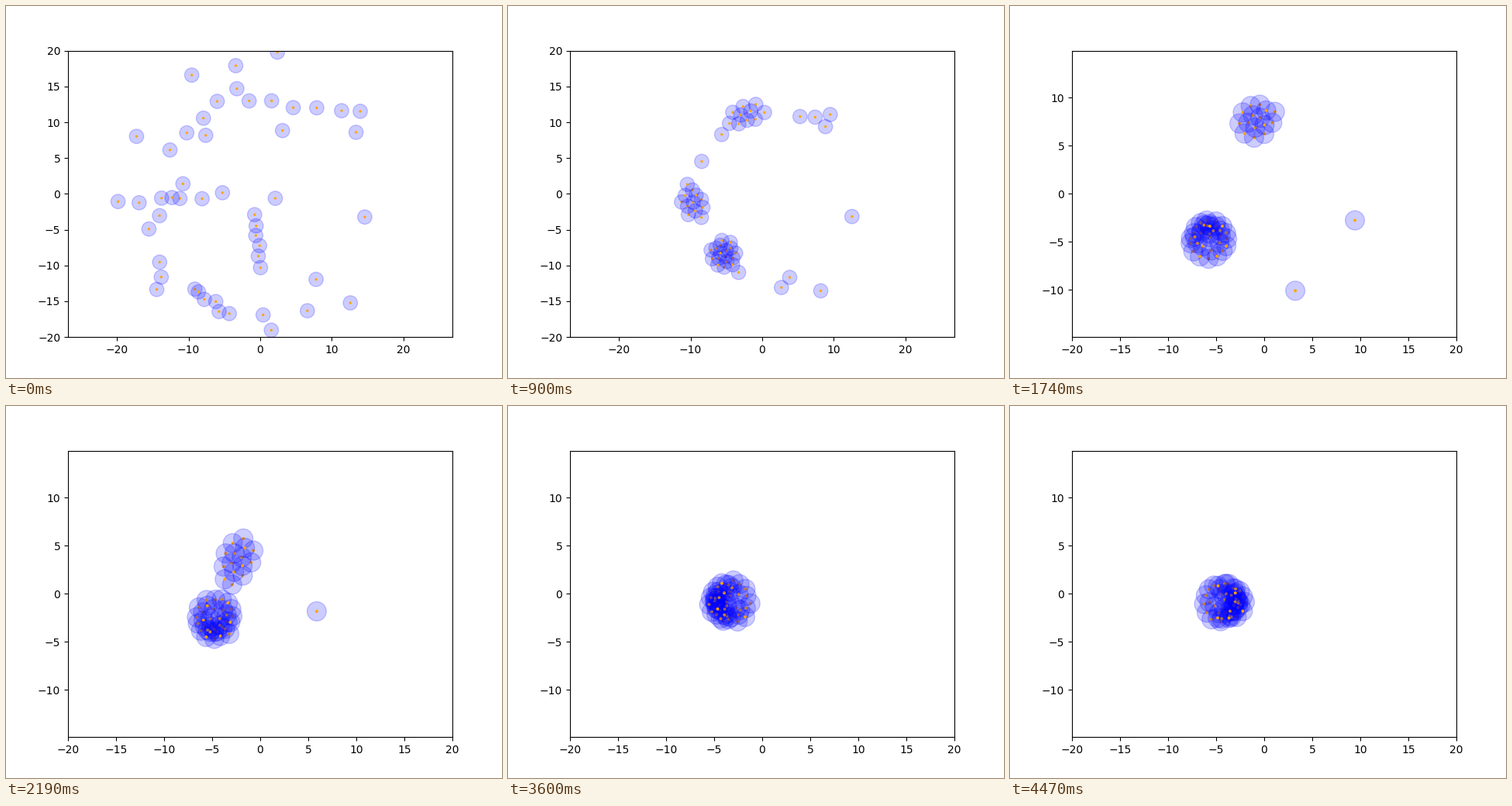
Animation, 640 px wide and 480 px high, one loop 4500 ms. Source, as a matplotlib script:

```python
import numpy as np
import matplotlib.pyplot as plt
from matplotlib.animation import FuncAnimation
from matplotlib.patches import Circle

FRAMES = 150
INTERVAL = 30
ZOOM_FRAME = 35      # the view tightens once the swarm is short enough
REST = 2.0           # distance at which two particles neither pull nor push
PULL = 15.5
SOFTEN = 6.0
PUSH_SHARE = 0.6
MAX_STEP = 0.8

# Loose strands of the starting scatter: first point, last point, particles
STRANDS = [
    ((2.1, 19.8), (-9.6, 16.7), 3),
    ((-12.8, 6.4), (-3.6, 14.8), 5),
    ((-17.6, 7.7), (13.3, 8.9), 4),
    ((-1.5, 13.0), (14.2, 11.2), 6),
    ((-19.8, -1.2), (-5.0, -0.2), 6),
    ((-15.8, -4.8), (-11.0, 1.6), 4),
    ((-13.9, -9.4), (-14.4, -13.7), 3),
    ((-9.4, -13.2), (-4.5, -16.8), 6),
    ((0.3, -10.3), (-0.6, -3.0), 6),
    ((2.1, -0.7), (15.0, -3.0), 2),
    ((0.8, -16.8), (12.5, -15.2), 3),
    ((1.6, -19.1), (7.5, -12.0), 2),
]


def scatter():
    points = np.vstack([np.linspace(a, b, n) for a, b, n in STRANDS])
    jitter = np.random.default_rng(4).uniform(-0.4, 0.4, points.shape)
    return points + jitter - jitter.mean(axis=0)


def advance(pos):
    """Attract at a distance, repel softly up close, limit the step."""
    diff = pos[None] - pos[:, None]
    dist = np.hypot(diff[..., 0], diff[..., 1])
    force = PULL * (dist - REST) / (dist ** 2 + SOFTEN) ** 2
    force *= np.where(dist < REST, PUSH_SHARE, 1)
    step = (diff * (force / np.maximum(dist, 1e-6))[..., None]).sum(axis=1)
    size = np.maximum(np.hypot(*step.T), 1e-9)
    step *= (MAX_STEP * np.tanh(size / MAX_STEP) / size)[:, None]
    return pos + step - step.mean(axis=0)


path = [scatter()]
for _ in range(FRAMES - 1):
    path.append(advance(path[-1]))

fig, ax = plt.subplots(figsize=(6.4, 4.8), dpi=100)
ratio = 496 / 369.6

# Each halo is followed by its dot, so later halos tint earlier dots
count = len(path[0])
pairs = []
for i in (k * 17 % count for k in range(count)):
    halo = ax.add_patch(Circle((0, 0), 1, color="blue", alpha=0.2))
    dot = ax.add_patch(Circle((0, 0), 0.1, color="orange"))
    pairs.append((i, halo, dot))


def draw(frame):
    half_width = 20 if frame >= ZOOM_FRAME else 20 * ratio
    ax.set_xlim(-half_width, half_width)
    ax.set_ylim(-half_width / ratio, half_width / ratio)
    for i, halo, dot in pairs:
        halo.center = dot.center = path[frame][i]
    return []


anim = FuncAnimation(fig, draw, frames=FRAMES, interval=INTERVAL,
                     init_func=lambda: draw(0), repeat=True, repeat_delay=0)
plt.show()
```
